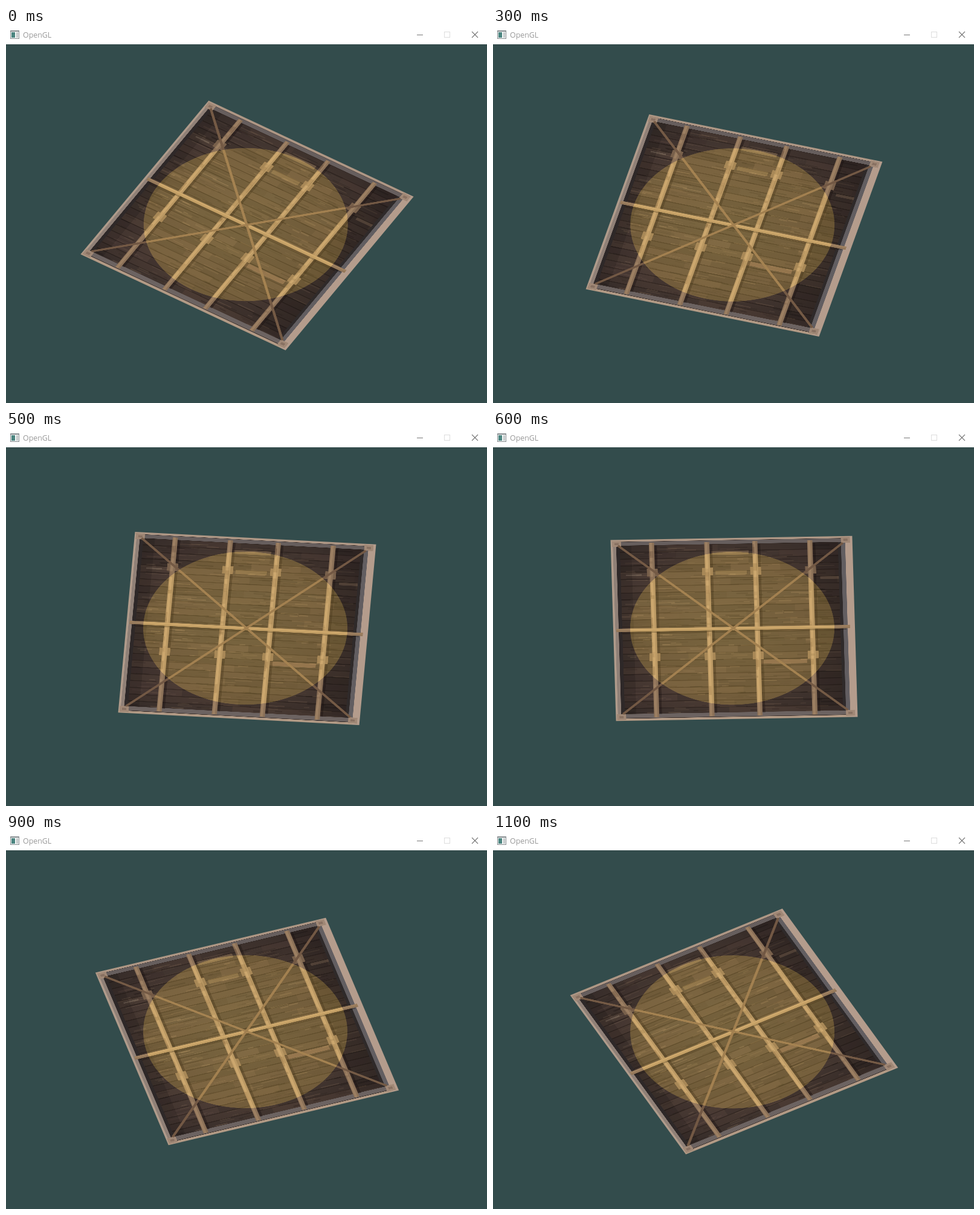
Write an HTML page with a canvas that moves like this. It is 796 px wide and 621 px high and loops after 1.2 s.

```html
<!DOCTYPE html>
<html lang="en">
<head>
<meta charset="utf-8">
<title>OpenGL</title>
<style>
  html, body { margin: 0; width: 100%; height: 100%; overflow: hidden; background: #334c4c; }
  canvas { position: absolute; left: 0; top: 0; display: block; }
  #title {
    position: absolute; left: 28px; top: 3px;
    font: 12.4px/17px "Open Sans", "Noto Sans", sans-serif; color: #999;
  }
</style>
</head>
<body>
<canvas id="stage" width="796" height="621"></canvas>
<div id="title">OpenGL</div>
<script>
const ctx = document.getElementById('stage').getContext('2d');
const STEP = 100;
// Clockwise turn in degrees, one pose per step
const ANGLES = [32, 26.5, 21.1, 15.2, 9.4, 4, -1.3, -5.3, -9.2, -17.6, -23.1, -28.6];
const SIZE = 400;
const BEAMS = [67.5, 159, 238.5, 329.5];

let seed = 11;
function rand(lo = 0, hi = 1) {
  seed = (seed * 16807) % 2147483647;
  return lo + (hi - lo) * seed / 2147483647;
}

function box(g, color, x, y, w, h) {
  g.fillStyle = color;
  g.fillRect(x, y, w, h);
}

function line(g, color, width, x1, y1, x2, y2) {
  g.strokeStyle = color;
  g.lineWidth = width;
  g.beginPath();
  g.moveTo(x1, y1);
  g.lineTo(x2, y2);
  g.stroke();
}

function drawPlanks(g) {
  const glow = g.createRadialGradient(190, 200, 30, 190, 200, 250);
  glow.addColorStop(0, '#4b3e35');
  glow.addColorStop(0.6, '#453731');
  glow.addColorStop(1, '#382d2a');
  box(g, glow, 0, 0, SIZE, SIZE);

  for (let y = 12; y < 388; y += 15) {
    let x = 12;
    while (x < 385) {
      const w = rand(80, 190);
      const tone = rand() < 0.5 ? '0,0,0' : '150,115,90';
      box(g, `rgba(${tone},${rand(0, 0.09)})`, x, y, w, 15);
      x += w;
    }
    box(g, 'rgba(20,14,12,.4)', 10, y, 380, 1.6);
  }
  for (let i = 0; i < 520; i++) {
    const tone = rand() < 0.55 ? '22,16,15' : '150,122,98';
    box(g, `rgba(${tone},${rand(0.06, 0.25)})`, rand(12, 350), rand(14, 384), rand(8, 36), rand(0.8, 3));
  }
  // Worn boards
  box(g, 'rgba(160,130,95,.4)', 166, 28, 62, 9);
  box(g, 'rgba(160,130,95,.3)', 172, 72, 52, 9);
  box(g, 'rgba(165,125,100,.35)', 243, 270, 76, 9);
  box(g, 'rgba(160,130,105,.35)', 345, 88, 32, 6);
  box(g, 'rgba(170,150,130,.3)', 24, 77, 26, 3);
  box(g, 'rgba(0,0,0,.16)', 336, 12, 50, 376);
  box(g, 'rgba(0,0,0,.12)', 12, 12, 22, 376);
}

function drawBeams(g) {
  for (const x of BEAMS) {
    box(g, 'rgba(20,14,12,.35)', x + 4, 14, 5, 372);
    for (const y of [74, 261]) box(g, '#78604b', x - 9, y - 9, 18, 17);
    box(g, '#8b7158', x - 4.3, 8, 8.6, 385);
    box(g, 'rgba(185,152,118,.35)', x - 3, 8, 4, 385);
    for (let i = 0; i < 14; i++) {
      box(g, `rgba(70,50,38,${rand(0.08, 0.22)})`, x - 4, rand(14, 365), rand(2, 7), rand(4, 20));
    }
  }
}

function drawRim(g) {
  // Shadow and metal lip inside the frame
  box(g, '#2e2828', 8, 8, 7, 384);
  box(g, '#2f2a2a', 376, 8, 5, 384);
  box(g, '#665e5d', 6, 5, 388, 8);
  box(g, '#6c6361', 6, 385, 382, 9);
  box(g, '#625e61', 381, 8, 7, 384);
  // Pale outer frame
  box(g, '#8f8077', 0, 0, 9, SIZE);
  box(g, '#b09b8b', 0, 0, 3.5, SIZE);
  box(g, '#ae9785', 0, 0, SIZE, 4.5);
  box(g, '#b29a85', 0, 395, SIZE, 5);
  box(g, '#b49c8c', 388, 0, 12, SIZE);
  for (const [x, y] of [[2, 3], [381, 2], [2, 385], [381, 384]]) {
    box(g, '#a08876', x, y, 15, 13);
    box(g, 'rgba(80,60,52,.3)', x + 4, y + 4, 7, 5);
  }
}

function drawBraces(g) {
  box(g, 'rgba(20,14,12,.3)', 12, 203, 374, 3.5);
  box(g, '#937759', 5, 196.4, 387, 7.2);
  box(g, 'rgba(190,156,118,.25)', 5, 197, 387, 3);
  line(g, '#745a45', 4.4, 12, 13, 384, 384);
  line(g, '#725844', 4.4, 384, 15, 12, 385);
}

function makePanel() {
  const panel = document.createElement('canvas');
  panel.width = panel.height = SIZE * 2;
  const g = panel.getContext('2d');
  g.scale(2, 2);
  drawPlanks(g);
  drawRim(g);
  drawBeams(g);
  drawBraces(g);
  // Yellow light adds to the wood
  g.globalCompositeOperation = 'lighter';
  g.fillStyle = 'rgb(48,40,12)';
  g.beginPath();
  g.arc(197, 199.5, 169, 0, Math.PI * 2);
  g.fill();
  return panel;
}

function drawWindowBar() {
  box(ctx, '#fff', 0, 0, 796, 27);
  box(ctx, '#858b8e', 7, 4, 15, 14);
  box(ctx, '#f7f8f8', 8, 6, 13, 11);
  box(ctx, '#4b8580', 9, 7, 6, 9);
  box(ctx, '#c3c8ca', 17, 7, 3, 9);
  box(ctx, '#777', 680, 11, 10, 1);
  ctx.strokeStyle = '#ddd';
  ctx.lineWidth = 1;
  ctx.strokeRect(725.5, 6.5, 9, 9);
  line(ctx, '#777', 1.1, 771, 6, 781, 16);
  line(ctx, '#777', 1.1, 781, 6, 771, 16);
}

const panel = makePanel();

function draw(now) {
  const turn = ANGLES[Math.floor(now / STEP) % ANGLES.length] * Math.PI / 180;
  const c = Math.cos(turn), s = Math.sin(turn);
  ctx.setTransform(1, 0, 0, 1, 0, 0);
  box(ctx, '#334c4c', 0, 0, 796, 621);
  drawWindowBar();
  // The turn happens in a square space squeezed to 4:3
  ctx.setTransform(c, s * 0.75, -s, c * 0.75, 399, 327);
  ctx.drawImage(panel, -SIZE / 2, -SIZE / 2, SIZE, SIZE);
  requestAnimationFrame(draw);
}
draw(performance.now());
</script>
</body>
</html>
```
